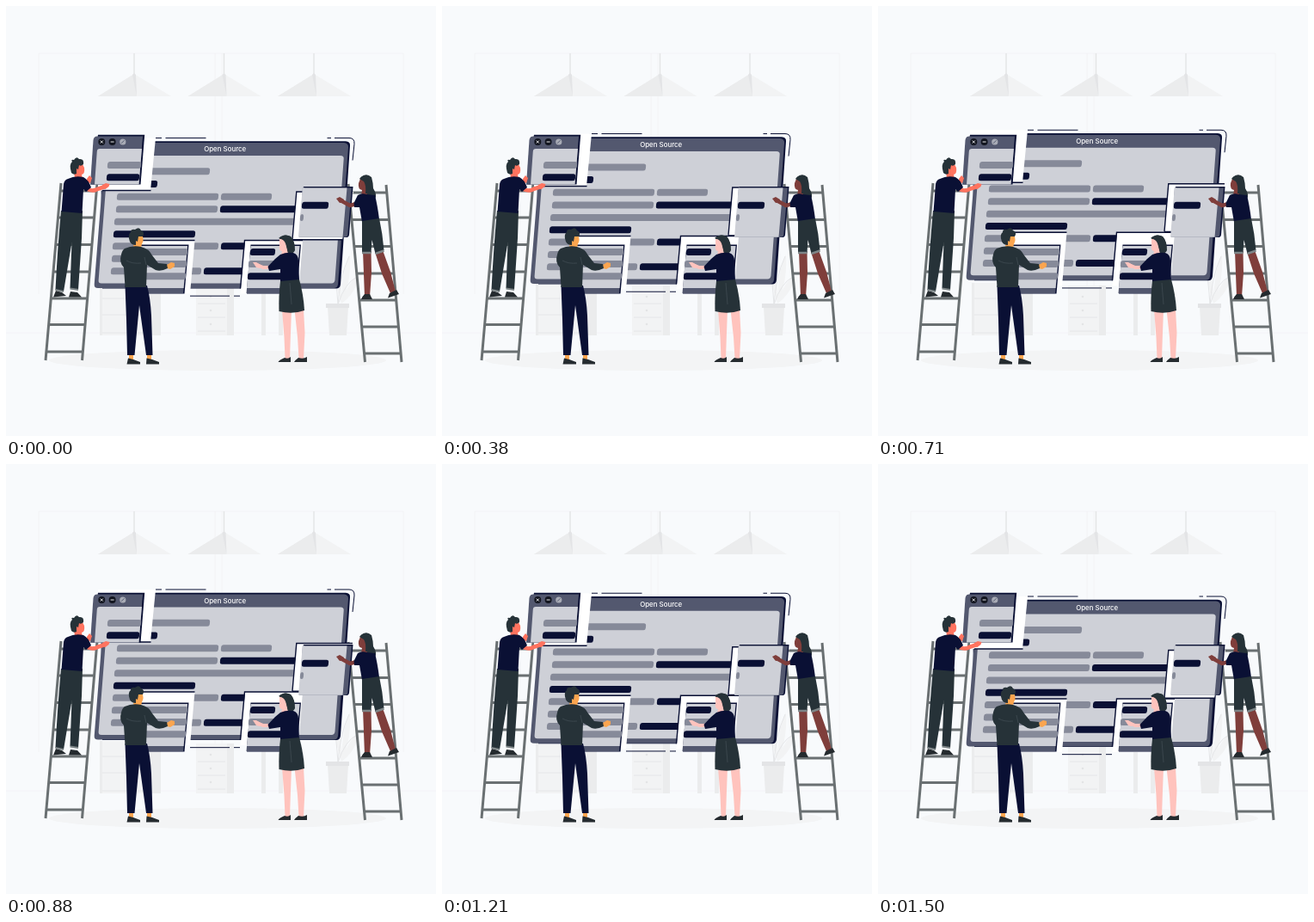
These frames come from a looping animation (500 by 500 pixels, 1540 ms). An HTML page:

```html
<!DOCTYPE html>
<html lang="en">
<head>
<meta charset="utf-8">
<title>Open Source</title>
<style>
  html, body { margin: 0; width: 100%; height: 100%; overflow: hidden; background: #f8fafc; }
  svg { display: block; width: 100vw; height: 100vh; }
  .navy { fill: #0a1034; }
  .frame { fill: #53586f; }
  .body { fill: #ced0d7; }
  .bar { fill: #868a99; }
  .dark { fill: #263238; }
  .shoe { fill: #252b2f; }
  .white { fill: #fff; }
  .edge { fill: none; stroke: #0a1034; stroke-width: 1.4; }
  .thin { fill: none; stroke: #0a1034; stroke-width: 1; }
  .ladder { fill: none; stroke: #6a7072; stroke-width: 3; }
  .coral { fill: #ff735f; }
  .amber { fill: #fba54f; }
  .pink { fill: #ffc3bd; }
  .brown { fill: #7f3e3b; }
  .p1 { fill: #f2f3f4; }
  .p2 { fill: #ebeced; }
  .p3 { fill: #e3e4e6; }
  .faint { fill: none; stroke: #f1f2f4; }
  .limb { fill: none; stroke-linecap: round; stroke-linejoin: round; }
  text { font: 500 7.9px Inter, "Open Sans", sans-serif; fill: #fff; text-anchor: middle; }
</style>
</head>
<body>
<svg viewBox="0 0 500 500">
  <defs>
    <g id="lamp">
      <path d="M-.7 55h1.4v25h-1.4z" class="p3"/>
      <path d="M0 79L-42 105H43z" class="p1"/>
      <path d="M0 79L-42 105H3z" class="p2"/>
      <path d="M-2 80L0 78L2 80L3 105z" class="p3"/>
    </g>
  </defs>

  <!-- room -->
  <path class="faint" d="M38 335V55H462V335M243 55V330M251 55V330M0 380H500" stroke-width=".8"/>
  <use href="#lamp" x="149"/><use href="#lamp" x="253.500"/><use href="#lamp" x="358"/>
  <ellipse cx="246" cy="412" rx="196" ry="12" fill="#f3f4f5"/>
  <path class="p1" d="M110 322h70v61h-70zM221 325h44v58h-44zM297 325h33v10h-33z"/>
  <path class="p2" d="M109 322h3v61h-3zM168 322h12v61h-12zM257 325h8v58h-8zM297 325h5v58h-5zM317 325h5v58h-5z"/>
  <path fill="none" stroke="#e5e6e8" d="M112 340h56M112 359h56M112 380h56M223 346h32M223 362h32M223 378h32"/>
  <g class="p3"><circle cx="238" cy="338" r="1.300"/><circle cx="238" cy="354" r="1.300"/><circle cx="238" cy="370" r="1.300"/></g>
  <path class="p1" d="M390 346Q379 310 381 298Q392 320 390 346Q391 306 400 289Q402 320 390 346Q399 318 410 314Q407 334 390 346"/>
  <path fill="none" stroke="#e5e6e8" d="M386 347Q388 315 399 291M386 347Q394 322 408 315M386 347Q384 318 381 300"/>
  <path class="p2" d="M374 350h24l-2 33h-20z"/><path class="p3" d="M372 346h27v5h-27z"/>

  <!-- ladders -->
  <path class="ladder" d="M64 206L46 412M106 206L88.500 412M63 215H105M60 246H102M58 277.500H100M55 309H97M52 340H94M50 370.500H92M47 402H89"/>
  <path class="ladder" d="M398 207L417.500 414M442 208L460 414M399 217H443M402 248.500H446M405 279.500H448M407 311H451M411 342H454M414 373H457M417 404H459"/>

  <!-- floating window -->
  <g id="panel">
    <path class="navy" d="M110 157.800H395Q400.500 158 400 163L389 324Q388.500 329 384 329H112z"/>
    <path class="frame" d="M110 159.500H393Q398.500 160 398 165L386 324Q385.500 328.500 381 328.500H107Q102.300 328.500 102.700 324L115 170z"/>
    <path class="body" d="M116 174.500H389Q393 174.500 392.700 178L382.500 319Q382 323 378.500 323H111Q107.300 323 107.600 319.500L117 200z"/>
    <text x="254.700" y="169.800">Open Source</text>
    <g id="panelBars"></g>
    <path class="white" d="M107 154H174L168 215H107z"/>
    <path class="edge" d="M112 215H168.500"/>
    <path class="white" d="M338 216.500H404L391 272H333z"/>
    <path class="edge" d="M333 272.300H391M333 272L337.800 216.500H403"/>
    <path class="white" d="M157 273H219.500L214 335H152z"/>
    <path class="edge" d="M157 273H219.500"/>
    <path class="white" d="M278 273H345L340 335H272.500z"/>
    <path class="edge" d="M272.500 329L277.500 273H345"/>
    <path class="thin" d="M174 154h7M185.500 154h47M373.500 154h4.500M382 154H399Q405.500 154 405 161L403 180M214 337.700h46M265 337.700h7"/>
  </g>

  <!-- fixed pieces -->
  <path class="navy" d="M107 149.800H161.200L156.500 207.500H98.500z"/>
  <path class="frame" d="M106 151.500H159L154.500 207.500H98L101.500 156Q102 151.500 106 151.500z"/>
  <path class="body" d="M109 166H158L154.500 207.500H103L105.800 169Q106 166 109 166z"/>
  <g fill="#12151f"><circle cx="111.300" cy="158" r="4"/><circle cx="123.600" cy="158" r="4"/></g>
  <circle cx="135.800" cy="158" r="3.600" fill="#a9acb6"/>
  <path d="M109.800 156.500l3 3m0-3l-3 3M121.600 158h4" stroke="#fff" stroke-width=".9"/>
  <path d="M134 159.800l3.600-3.600" stroke="#53586f" stroke-width=".9"/>

  <path class="navy" d="M345.500 210H403.500L399 266Q398.500 269 396 269H393z"/>
  <path class="frame" d="M345 211.500H402L397.300 266Q397 268.800 394 268.800H341z"/>
  <path class="body" d="M344.800 211.500H396.500L391.500 268.800H340z"/>

  <path class="navy" d="M157 277.500H212.500L207.500 334.500H152z"/>
  <path class="frame" d="M157 279H211L206 334H152z"/>
  <path class="body" d="M157 279H211L206.600 328H152z"/>

  <path class="navy" d="M284.500 277.500H343L338 334.500H280z"/>
  <path class="frame" d="M284.500 279H341.500L336.500 334H279.500z"/>
  <path class="body" d="M284.500 279H341.500L337 328H280z"/>
  <g id="pieceBars"></g>

  <!-- man on the left ladder -->
  <path class="coral" d="M94 201l3-4l3 3l-2 6l-4-1z"/>
  <path class="limb" stroke="#ff735f" stroke-width="4.500" d="M95 213Q101 216 106 213L115 210"/>
  <path class="coral" d="M112 208l4-2l4.500 1l-1 3l-4 3l-4-1z"/>
  <path class="coral" d="M79 191L80 201L89 201L88 196Q92 195 91 188L88 182L80 183z"/>
  <path class="dark" d="M76 194Q73 184 77 181Q75 178 79 179Q82 174 85 178Q91 177 90 184Q87 187 85 185L84 190L82 189L82 195Q79 197 76 194z"/>
  <path class="dark" d="M64 238H89L88 270L84 330L74.500 328L76.500 275L67 332L57.500 330Q60 280 64 238z"/>
  <path class="navy" d="M72 201Q80 197 90 199Q96 202 99 211L93 216L90 213L88.500 241L64.500 239L67 207Q68 202 72 201z"/>
  <path class="shoe" d="M58 331L65 333L70 337L55 338.500zM75 332L83 333L88 338.500H73z"/>
  <path d="M57.500 330l9.500 2M74.500 328.500l9.500 1.500" stroke="#7d8587" stroke-width="2"/>

  <!-- woman on the right ladder -->
  <path class="brown" d="M415 285H424.500L425 310L423 338H417zM429 286L438 284L447 309L453 332L447 334L437 311z"/>
  <path class="limb" stroke="#7f3e3b" stroke-width="4.500" d="M411 229L400 232L389 226"/>
  <path class="brown" d="M384 224l4-2l5 3l-1 3l-4 1z"/>
  <path class="dark" d="M413 199Q419 194 425 199Q427 206 427 212Q432 220 429 224Q422 228 416 222z"/>
  <path class="brown" d="M412 201Q418 200 418 207L420 220L413 221L414 214Q409 213 410 206z"/>
  <path class="dark" d="M411 201Q415 195 422 197Q427 203 426 218L418 218Q419 208 416 204z"/>
  <path class="navy" d="M409 220Q414 217 419 219L429 220Q432 232 434 248L414 251L411 234L405 234L404.500 229z"/>
  <path class="dark" d="M414 250L434 247Q438 265 439.500 284L429.500 288L425.500 272L424.500 287H414z"/>
  <path d="M414 287H424.500M429.500 288L439.500 284.500" stroke="#7d8587" stroke-width="2.500"/>
  <path class="shoe" d="M417 335H423L426 341H413Q414 338 417 335zM446 334L454 330L457 335L444 339.500z"/>

  <!-- man on the floor -->
  <path class="amber" d="M143 402h5v9h-5zM164 402h5v9h-5z"/>
  <path class="navy" d="M138.500 325H164Q168 340 169 360L170.500 406H163L155 348L149.500 406H141L140 365z"/>
  <path class="shoe" d="M142 409.500L148 411L156 414V416.500H140.500zM163.500 409.500L170 411L178 414V416.500H163z"/>
  <path class="amber" d="M187 301l5-3l4 1v4l-5 3l-4-1zM149 266L158 265Q161 272 158 277L156 284H148z"/>
  <path class="dark" d="M144 274Q141 266 145 263Q145 259 150 260Q155 256 157 261Q162 263 159 268L154 268L153 274L151 273L151 278Q146 278 144 274z"/>
  <path class="dark" d="M138 282Q147 278 157 280Q166 282 170 290L177 299L187 300L188 305Q180 309 174 307L164 301L163 327H138.500L137 304Q131 298 134 289Q135 284 138 282z"/>
  <path fill="none" stroke="#445056" stroke-width=".7" d="M140 296Q147 300 157 299M163 301L161 292"/>

  <!-- woman on the floor -->
  <path class="pink" d="M321 353H332L331 380L330 410H324.500L323.500 385zM335.500 353H346L347.500 380L346 410H340.500L339 385z"/>
  <path class="shoe" d="M324 409Q328 411 331 408V414H316.500Q317 412 324 409zM340 409Q346 411 350 408V414H335Q336 412 340 409z"/>
  <path class="limb" stroke="#ffc3bd" stroke-width="4" d="M309 304L299 304L292 301"/>
  <path class="pink" d="M287 298l4 0l5 3l-1 4l-4-1z"/>
  <path class="dark" d="M318 270Q324 264 331 268Q336 274 336 284Q334 289 328 288z"/>
  <path class="pink" d="M318 271Q326 270 326 278L328 289L320 290L321 285Q317 285 318 278z"/>
  <path class="dark" d="M317 270Q323 264 331 268Q337 274 335 286L328 286L325 276Q323 271 317 270z"/>
  <path class="navy" d="M319 289Q326 286 334 287Q340 289 340 296L341 319L319 321L319 306L306 308L304.500 303L313 294z"/>
  <path class="dark" d="M319 320L341 318Q346 336 347 354Q333 359 317.500 355Q317 336 319 320z"/>
  <path fill="none" stroke="#445056" stroke-width=".7" d="M330 322L332 347"/>
</svg>
<script>
  const el = id => document.getElementById(id);
  const panel = el('panel');

  // each row: left, right, centre y, navy flag
  const drawBars = (group, rows) => {
    group.innerHTML = rows.map(([x1, x2, y, navy]) =>
      `<rect class="${navy ? 'navy' : 'bar'}" x="${x1 - x2 >> 1}" y="-4" width="${x2 - x1}" height="8" rx="2.5"
        transform="translate(${x1 - (x1 - x2 >> 1)} ${y}) skewX(-5)"/>`).join('');
  };

  drawBars(el('panelBars'), [
    [150, 237, 192.9], [150, 176, 207.5, 1],
    [129, 247, 222.3], [250, 309, 222.3],
    [128, 246, 236.9], [249, 345, 236.9, 1],
    [126, 345, 251.4],
    [125, 220, 265.8, 1],
    [124, 247, 279.9], [250, 285, 279.9, 1],
    [123, 190, 294.4],
    [122, 227, 308.7], [230, 285, 308.7, 1]
  ]);
  drawBars(el('pieceBars'), [
    [118, 157, 185], [117, 155, 199.2, 1],
    [344, 375, 231.8, 1], [342, 346, 246],
    [155, 211, 286], [155, 210, 300], [155, 209, 314.3],
    [284, 313, 286, 1], [282, 339, 300], [281, 322, 314.3, 1]
  ]);

  const PERIOD = 1540, RISE = 10, LEAD = 40;
  function tick() {
    const phase = (performance.now() + LEAD) % PERIOD / PERIOD;
    const lift = RISE * (1 - Math.abs(2 * phase - 1));
    panel.setAttribute('transform', `translate(0 ${-lift})`);
    requestAnimationFrame(tick);
  }
  tick();
</script>
</body>
</html>
```
